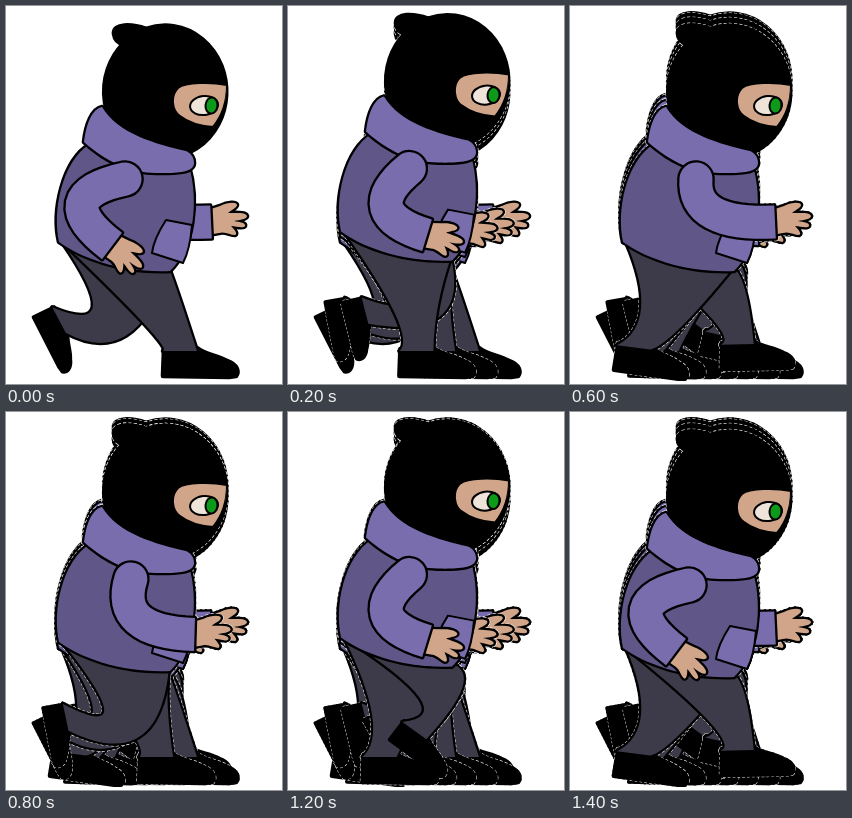
These frames come from a looping animation (276x378 px, 1.5 s). An HTML page with a canvas:

```html
<!DOCTYPE html>
<html lang="en">
<head>
<meta charset="utf-8">
<title>Sneaking walk</title>
<style>
  html, body { margin: 0; width: 100%; height: 100%; overflow: hidden; background: #fff; }
  canvas { display: block; }
</style>
</head>
<body>
<canvas width="276" height="378"></canvas>
<script>
const ctx = document.querySelector('canvas').getContext('2d');
const LOOP = 1500, STEP = 100, HALF = 7, CYCLE = 14;
const SLEEVE = '#7a6dae', TORSO = '#605687', PANTS = '#3d3b49', SKIN = '#d0a58a';

const torso = new Path2D('M84 138C56 155 46 205 53 236C75 252 115 267 164 265C188 242 193 195 183 160Z');
const pocket = new Path2D('M186 219L160 214C151 228 147 238 146 247L177 257Q184 244 186 219Z');
const hood = new Path2D('M96 101C86 103 80 118 78 136C100 156 125 167 150 167C165 167 188 168 188 157C188 150 184 147 180 145C150 138 112 128 96 101Z');
const head = new Path2D('M140 23C126 18 107 17 108 28C109 35 113 37 117 38A61 66 0 1 0 140 23Z');
const faceHole = new Path2D('M221 79C205 76 180 76 172 82C164 90 166 105 174 110C183 117 194 120 207 121C216 110 221 96 221 79Z');
const hand = new Path2D('M-3-12L9-16C17-20 26-20 26-17C26-14 20-12 17-9C26-9 35-10 36-6C36-3 29-2 23-1C29 0 35 1 34 4C32 7 25 4 20 4C24 8 27 12 24 13C19 13 14 9 8 11L-3 13Z');
const foot = new Path2D('M-16-2L17-3C25 4 37 4 47 10C58 14 59 21 56 25L49 26L-17 25Z');

function paint(path, fill, halo) {
  ctx.strokeStyle = halo ? '#fff' : '#000';
  ctx.lineWidth = halo ? 5.6 : 4.6;
  ctx.setLineDash(halo ? [3, 2] : []);
  ctx.stroke(path);
  if (halo) return;
  ctx.fillStyle = fill;
  ctx.fill(path);
}

function placed(path, fill, halo, x, y, angle, scale = 1) {
  ctx.save();
  ctx.translate(x, y);
  ctx.rotate(angle * Math.PI / 180);
  ctx.scale(scale, scale);
  paint(path, fill, halo);
  ctx.restore();
}

// The foot slides back on the ground, then lifts and swings forward.
function footPose(phase) {
  const s = (phase - HALF) / HALF;
  if (s < 0) {
    const lift = 31 * (phase / HALF) ** 14;
    return { x: 174 - 25 * phase + 1.1 * phase ** 2, lift, angle: 2 * lift };
  }
  const lift = (1 - s) * (31 + 125 * s * (1 - s));
  return {
    x: 53 + 121 * s * s * (3 - 2 * s),
    lift,
    angle: 2 * lift - 20 * Math.sin(Math.PI * s * s)
  };
}

function leg(phase, bob, halo) {
  const { x, lift, angle } = footPose(phase % CYCLE);
  const y = 345 - lift, scale = 1 - lift / 200;
  placed(foot, '#000', halo, x, y, angle, scale);

  const hipX = 108, hipY = 250 + bob;
  const length = Math.hypot(x - hipX, y - hipY);
  const nx = (y - hipY) / length, ny = (hipX - x) / length;
  const ankleX = 17 * Math.cos(angle * Math.PI / 180) * scale;
  const ankleY = 17 * Math.sin(angle * Math.PI / 180) * scale;
  const kneeAt = offset => [
    hipX + 0.62 * (x - hipX) + nx * (10 + lift + offset),
    hipY + 0.62 * (y - hipY) + ny * (10 + lift + offset)
  ];
  const path = new Path2D();
  // Quadratic edge that passes through the knee halfway.
  const edge = (a, knee, b) => {
    const [cx, cy] = knee.map((k, i) => 2 * k - (a[i] + b[i]) / 2);
    path.lineTo(...a);
    path.quadraticCurveTo(cx, cy, ...b);
  };
  edge([56, 236 + bob], kneeAt(-24), [x - ankleX, y - ankleY]);
  edge([x + ankleX, y + ankleY], kneeAt(20), [163, 262 + bob]);
  path.closePath();
  paint(path, PANTS, halo);
}

function sleeve(shoulder, bend, wrist, half) {
  const mix = (a, b, t) => a.map((v, i) => v + (b[i] - v) * t);
  const heading = (a, b) => Math.atan2(b[1] - a[1], b[0] - a[0]);
  const left = [], right = [];
  for (let t = 0; t <= 1; t += 1 / 16) {
    const a = mix(shoulder, bend, t), b = mix(bend, wrist, t);
    const [x, y] = mix(a, b, t);
    const dx = -half * Math.sin(heading(a, b)), dy = half * Math.cos(heading(a, b));
    left.push([x + dx, y + dy]);
    right.unshift([x - dx, y - dy]);
  }
  const path = new Path2D();
  for (const point of [...left, ...right]) path.lineTo(...point);
  const a = heading(shoulder, bend);
  path.arc(...shoulder, half, a - Math.PI / 2, a + Math.PI / 2, true);
  path.closePath();
  return path;
}

// swing runs from 0 (arm back) to 1 (arm forward)
function arm(swing, halo) {
  const shoulder = [119 + 7 * swing, 173];
  const bend = [40 + 82 * swing, 190 + 110 * swing - 80 * swing ** 2];
  const wrist = [106 + 99 * swing, 240 - 24 * swing ** 4];
  placed(hand, SKIN, halo, ...wrist, 45 * (1 - swing) ** 2);
  paint(sleeve(shoulder, bend, wrist, 16.5), SLEEVE, halo);
}

function thinOutline(path, fill) {
  ctx.fillStyle = fill;
  ctx.strokeStyle = '#000';
  ctx.lineWidth = 2;
  ctx.setLineDash([]);
  ctx.fill(path);
  ctx.stroke(path);
}

function ellipse(x, y, rx, ry, tilt) {
  const path = new Path2D();
  path.ellipse(x, y, rx, ry, tilt, 0, 7);
  return path;
}

function face() {
  ctx.save();
  ctx.clip(head);
  thinOutline(faceHole, SKIN);
  thinOutline(ellipse(198, 99.5, 14, 9.5, -0.12), '#eee4da');
  thinOutline(ellipse(205.5, 99.5, 6, 8, 0.1), '#0c9a18');
  ctx.restore();
}

function figure(u, halo) {
  const beat = u % HALF;
  const bob = -12 * Math.sin(Math.PI * beat / 6);
  const swing = (u < HALF ? beat : 6 - beat) / 6;
  const lifted = draw => {
    ctx.save();
    ctx.translate(0, bob);
    draw();
    ctx.restore();
  };
  lifted(() => arm(1 - swing, halo));
  leg(u + HALF, bob, halo);
  leg(u, bob, halo);
  lifted(() => {
    paint(torso, TORSO, halo);
    if (!halo) thinOutline(pocket, SLEEVE);
    paint(head, '#000', halo);
    if (!halo) face();
    paint(hood, SLEEVE, halo);
    arm(swing, halo);
  });
}

ctx.lineJoin = 'round';
let shown = -1;

// Every pose is laid over the earlier ones until the loop restarts.
function render(now) {
  const step = Math.floor(now % LOOP / STEP);
  const last = step < 9 ? step : step - 1; // one pose is held twice as long
  if (last === shown) return;
  shown = last;
  ctx.fillStyle = '#fff';
  ctx.fillRect(0, 0, 276, 378);
  for (let u = 0; u <= last; u++) {
    figure(u, true);
    figure(u, false);
  }
}

const start = performance.now();
function tick() {
  render(performance.now() - start);
  requestAnimationFrame(tick);
}
tick();
</script>
</body>
</html>
```
